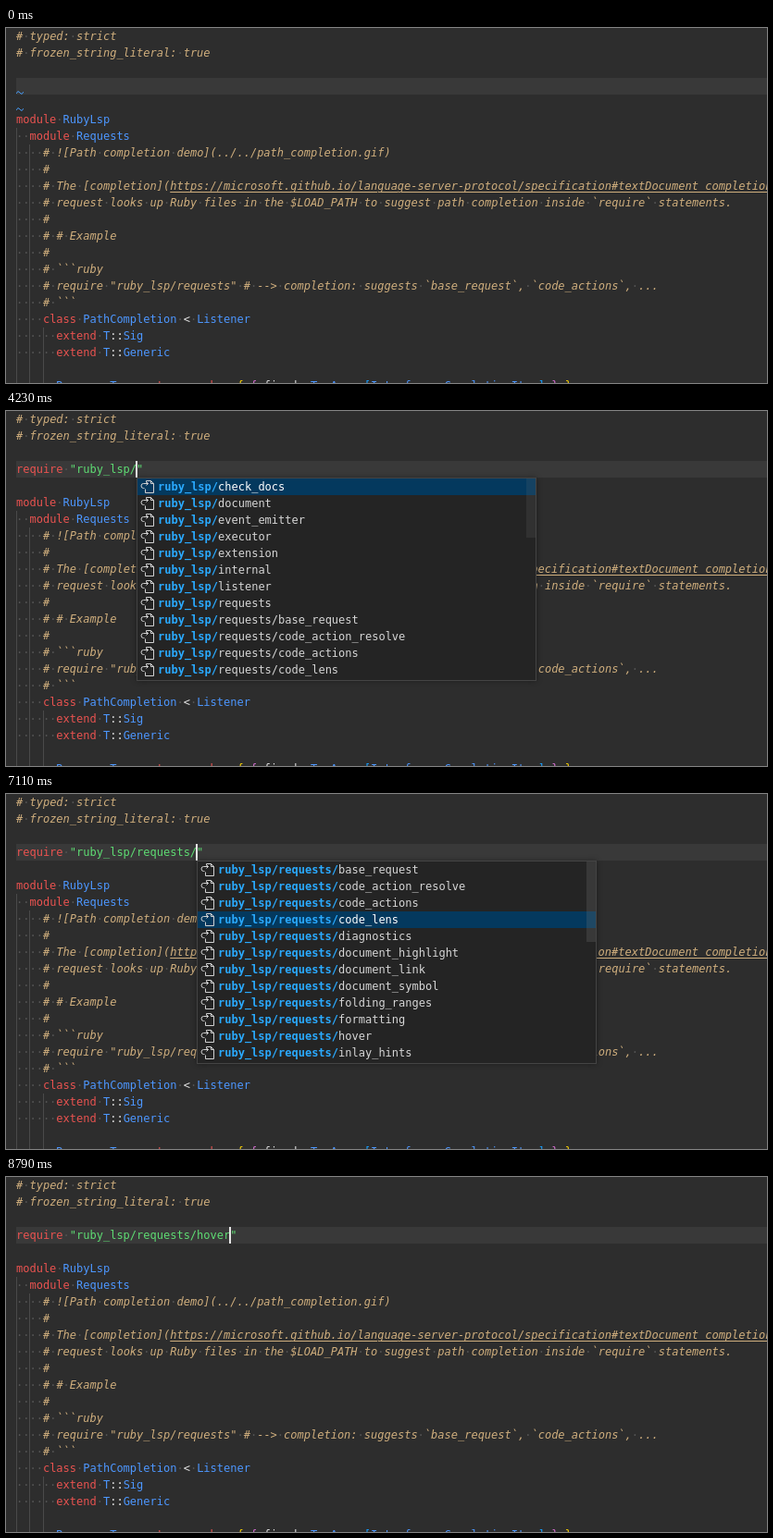
Animation, 822 px wide and 384 px high, one loop 9030 ms. Source, as an HTML page:

```html
<!DOCTYPE html>
<html lang="en">
<head>
<meta charset="utf-8">
<title>Path completion</title>
<style>
  html, body { margin: 0; width: 100%; height: 100%; overflow: hidden; background: #2d2d2d; }
  #stage {
    position: relative; width: 822px; height: 384px; overflow: hidden;
    font: 12px/18px "DejaVu Sans Mono", monospace; color: #e4e4e4; white-space: pre;
  }
  #stage > *, .list > * { position: absolute; }
  .line { left: 11px; height: 18px; }
  .active { left: 11px; right: 0; top: 54px; height: 18px; background: #393939; }
  .guide { width: 1px; bottom: 0; background: #4a4a4a; }
  .dot { color: #545454; font-style: normal; }
  .comment { color: #cfae7d; font-style: italic; }
  .comment u { text-underline-offset: 2px; text-decoration-thickness: 1px; }
  .key { color: #ea5350; }
  .name { color: #4d97ff; }
  .str { color: #5edc73; }
  .b0 { color: #ffd700; }
  .b1 { color: #da70d6; }
  .b2 { color: #179fff; }
  .squiggle { left: 11px; width: 8px; height: 4px; fill: none; stroke: #479bf5; }
  .squiggle svg { display: block; }
  #caret { top: 54px; width: 2px; height: 18px; background: #e6e6e6; }
  .list {
    top: 72px; width: 432px; box-sizing: border-box; border: 1px solid #444; background: #242424;
    box-shadow: 0 0 6px rgba(0, 0, 0, .36); visibility: hidden;
  }
  .row { left: 0; right: 0; height: 18px; padding-left: 22px; color: #d6d6d6; }
  .row.on { background: #04395e; color: #fff; }
  .row b { color: #2aaaff; }
  .row svg { position: absolute; left: 3px; top: 1px; width: 16px; height: 16px; fill: none; stroke: #d0d0d0; }
  .slider { right: 0; top: 0; width: 10px; background: rgba(121, 121, 121, .4); }
</style>
</head>
<body>
<div id="stage"></div>
<script>
const LOOP = 9030, CHAR = 7.224, LEFT = 11, ROW = 18;
const stage = document.getElementById('stage');

const demoPath = '../../path_completion.gif';
const code = `# typed: strict
# frozen_string_literal: true



module RubyLsp
  module Requests
    # ![Path completion demo](${demoPath})
    #
    # The [completion](https://microsoft.github.io/language-server-protocol/specification#textDocument_completion)
    # request looks up Ruby files in the $LOAD_PATH to suggest path completion inside \`require\` statements.
    #
    # # Example
    #
    # \`\`\`ruby
    # require "ruby_lsp/requests" # --> completion: suggests \`base_request\`, \`code_actions\`, ...
    # \`\`\`
    class PathCompletion < Listener
      extend T::Sig
      extend T::Generic

      ResponseType = type_member { { fixed: T::Array[Interface::CompletionItem] } }`;

// Text typed before the caret, piece by piece.
const keys = [
  [30, 'r'], [300, 'e'], [390, 'q'], [480, 'u'], [630, 'i'], [690, 'r'], [750, 'e'],
  [1260, ' '], [1410, '"'], [1590, 'r'], [1650, 'u'], [1740, 'b'], [1920, 'y'], [2220, '_'],
  [2490, 'l'], [2580, 's'], [2730, 'p'], [3120, '/'], [5370, 'requests'], [6150, '/'], [8670, 'hover']
];
const caretOff = [[0, 30], [3570, 4050], [4500, 4950], [5940, 6150], [6600, 7080], [7560, 8010], [8400, 8670]];

const lists = [
  { from: 60, to: 390, col: 1, prefix: 'r', words: 'equire equire_relative equest equests escue eturn eturns edo etry uby uby_lsp aise' },
  { from: 390, to: 810, col: 1, prefix: 'req', words: 'uire uire_relative uest uests uires uired' },
  {
    from: 3270, to: 5370, col: 18, prefix: 'ruby_lsp/', slider: 64,
    words: 'check_docs document event_emitter executor extension internal listener requests ' +
      'requests/base_request requests/code_action_resolve requests/code_actions requests/code_lens',
    moves: [4740, 4770, 4830, 4860, 4920, 4950, 5010]
  },
  {
    from: 6300, to: 8670, col: 27, prefix: 'ruby_lsp/requests/', slider: 87,
    words: 'base_request code_action_resolve code_actions code_lens diagnostics document_highlight ' +
      'document_link document_symbol folding_ranges formatting hover inlay_hints',
    moves: [6840, 6960, 7080, 7740, 7860, 8250, 8280, 8310, 8340, 8370]
  }
];

const icon = '<svg viewBox="0 0 16 16"><path d="M5.5 10.5v4h9v-10l-3-3h-5v2M11.5 1.5v3h3"/>' +
  '<path d="M4.5 9.5h-1a2.5 2.5 0 0 1 0-5h5M6.5 2.5l2 2-2 2"/></svg>';

const escapeHtml = s => s.replace(/&/g, '&amp;').replace(/</g, '&lt;').replace(/>/g, '&gt;');
const span = (cls, s) => `<span class="${cls}">${s}</span>`;
const dots = s => s.replace(/ /g, '\u00b7').replace(/\u00b7+/g, m => span('dot', m));
const columnX = col => LEFT + col * CHAR;

function add(parent, cls, style = {}, html = '') {
  const el = document.createElement('div');
  el.className = cls;
  el.innerHTML = html;
  Object.assign(el.style, style);
  parent.append(el);
  return el;
}

function paintComment(text) {
  return span('comment', dots(escapeHtml(text)).replace(/https:[^)]+/, '<u>$&</u>'));
}

function paintCode(text) {
  let depth = 0;
  return text.replace(/ +|[A-Z]\w*|[a-z]\w*:?(?!:)|[{}[\]]|[^\w\s]/g, token => {
    if (token[0] === ' ') return dots(token);
    if (/[{[]/.test(token)) return span('b' + depth++, token);
    if (/[}\]]/.test(token)) return span('b' + --depth, token);
    if (/^[A-Z]/.test(token)) return span('name', token);
    if (/^[a-z]\w*$/.test(token)) return span('key', token);
    return escapeHtml(token);
  });
}

function paintTyped(text) {
  const [word, path] = text.split('"');
  const html = word.startsWith('require') ? span('key', 'require') + dots(word.slice(7)) : word;
  return path === undefined ? html : html + span('str', `"${path}"`);
}

add(stage, 'active');
[[0, 6], [2, 7], [4, 18]].forEach(([col, row]) =>
  add(stage, 'guide', { left: Math.round(columnX(col)) + 'px', top: row * ROW + 'px' }));
code.split('\n').forEach((text, row) => {
  const paint = text.trim()[0] === '#' ? paintComment : paintCode;
  if (text) add(stage, 'line', { top: row * ROW + 'px' }, paint(text));
});

const squiggles = [68, 86].map(top => add(stage, 'squiggle', { top: top + 'px' },
  '<svg width="8" height="4"><path d="M0 3Q2 -1 4 2T8 1"/></svg>'));
const typedLine = add(stage, 'line', { top: '54px' });
const caret = add(stage, '');
caret.id = 'caret';

for (const list of lists) {
  const words = list.words.split(' ');
  list.el = add(stage, 'list', {
    left: Math.round(columnX(list.col)) + 'px',
    height: words.length * ROW + 4 + 'px'
  });
  list.rows = words.map((word, i) =>
    add(list.el, 'row', { top: i * ROW + 'px' }, `${icon}<b>${list.prefix}</b>${word}`));
  if (list.slider) list.bar = add(list.el, 'slider', { height: list.slider + 'px' });
}

let shownText = '';
function draw(t) {
  const text = keys.filter(([time]) => time <= t).map(([, piece]) => piece).join('');
  if (text !== shownText) typedLine.innerHTML = paintTyped(shownText = text);
  squiggles.forEach(el => el.style.visibility = text ? 'hidden' : 'visible');
  caret.style.left = Math.round(columnX(text.length)) - 1 + 'px';
  caret.style.visibility = caretOff.some(([a, b]) => t >= a && t < b) ? 'hidden' : 'visible';

  for (const { el, rows, bar, from, to, moves = [] } of lists) {
    el.style.visibility = t >= from && t < to ? 'visible' : 'hidden';
    const selected = moves.filter(time => time <= t).length;
    rows.forEach((row, i) => row.classList.toggle('on', i === selected));
    // The scrollbar lingers after opening, then fades out.
    if (bar) bar.style.opacity = Math.max(0, Math.min(1, 1 - (t - from - 480) / 780));
  }
}

let start;
function tick(now) {
  start ??= now;
  draw((now - start) % LOOP);
  requestAnimationFrame(tick);
}
draw(0);
requestAnimationFrame(tick);
</script>
</body>
</html>
```
